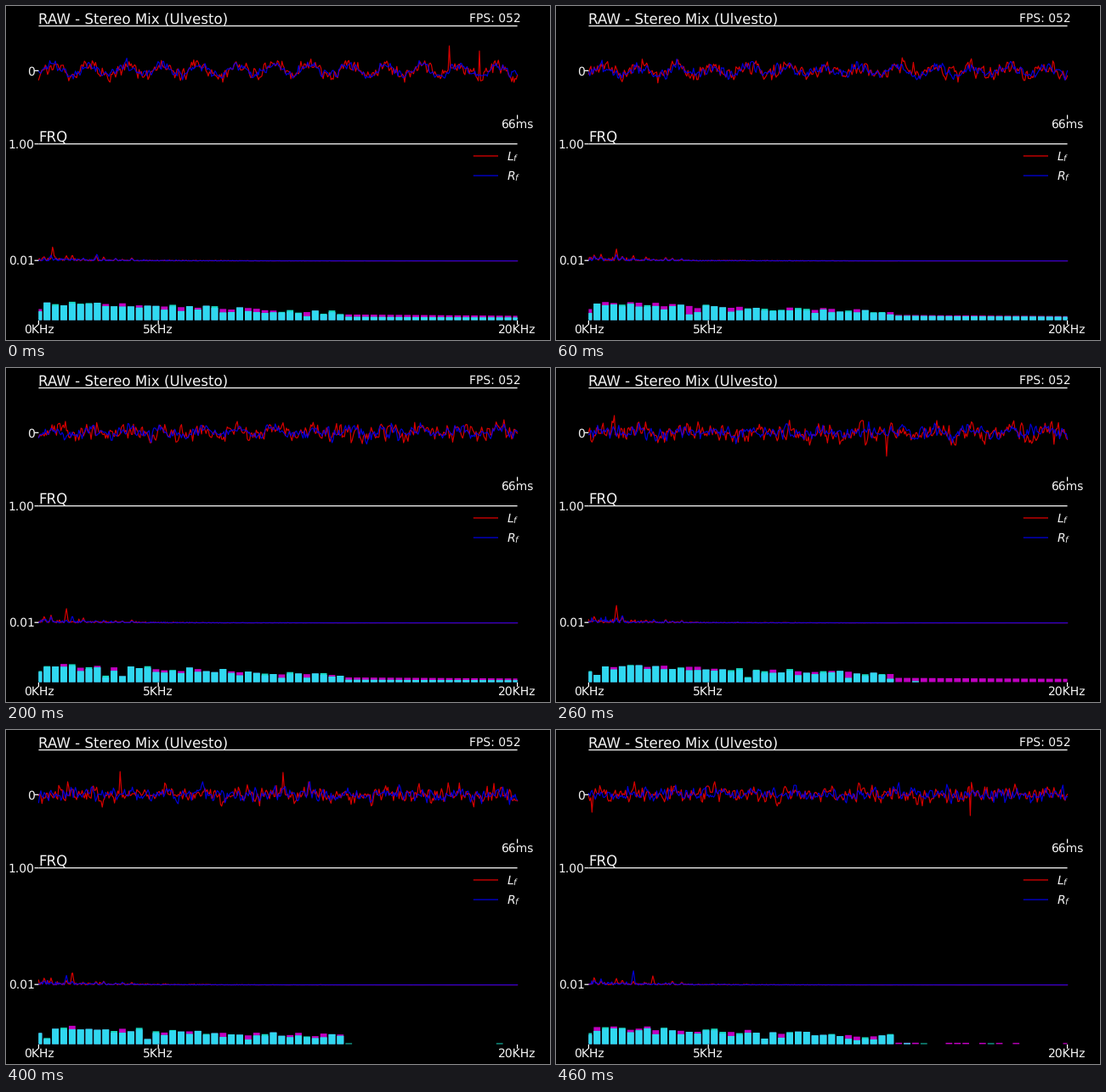
Animation, 640 px wide and 394 px high, one loop 0.52 s. Source, as a matplotlib script:

```python
import numpy as np
import matplotlib.pyplot as plt
from matplotlib.animation import FuncAnimation

plt.rcParams["font.family"] = "DejaVu Sans"
plt.rcParams["mathtext.fontset"] = "dejavusans"
plt.rcParams["text.hinting"] = "no_hinting"

W, H, DPI = 640, 394, 100
LEFT, RIGHT = 38.4, 601.6
WAVE_Y, FREQ_Y, BAR_Y = 76, 300.7, 370.5
BARS, BODY, STEP, HALF = 58, 37, 9.86, 3.9
TICK_MS, LOOP_MS = 10, 520
STARTS = [0, 60, 130, 200, 260, 330, 400, 460]
PITCHES = [45, 53, 71, 78, 91, 106, 115, 129, 137, 148]

wave_x = np.linspace(LEFT, RIGHT, 430)
freq_x = np.linspace(LEFT, RIGHT, 620)
index = np.arange(BARS)


def wave(rng, swing, rough, spikes=()):
    """Rough noise on a slow swell; spikes are (x, y) extremes."""
    noise = np.convolve(rng.normal(size=wave_x.size), [0.2, 0.9, 0.2], "same")
    swell = swing * np.cos(2 * np.pi * (wave_x - 55) / 43.5)
    y = WAVE_Y - np.clip(swell + rough * noise, -15, 15)
    for px, py in spikes:
        y[np.argmin(abs(wave_x - px))] = py
    return y


def spectrum(rng, strength, main):
    """Fading noise with narrow peaks at the pitches and one main peak."""
    d = freq_x - LEFT
    h = abs(rng.normal(size=d.size)) * (1.9 * np.exp(-d / 75)
                                        + 0.4 * np.exp(-d / 180))
    fade = np.exp(-(np.array(PITCHES) - LEFT) / 110)
    heights = strength * fade * rng.uniform(0.2, 1, len(PITCHES))
    for px, ph in [*zip(PITCHES, heights), main]:
        h = np.maximum(h, ph * (1 - abs(freq_x - px) / 2.4))
    return FREQ_Y - h


def bars(rng, tail, cap):
    """Bar heights of both channels: a sloping body, then a low tail."""
    top = 20.5 - 0.31 * index + rng.uniform(-2.5, 2.5, BARS)
    top[0] = 13
    drop = rng.uniform(1.5, 5, BARS) * (rng.random(BARS) < 0.4)
    dips = rng.random(BARS) < 0.08
    right = np.where(dips, 0.4 * top, top - drop)
    left = np.where(drop > 0, top, right - rng.choice([0, 0, 1, 2], BARS))

    rest = index >= BODY
    taper = np.interp(index, [BODY, BARS - 1], [1.1, 0.85])
    right[rest] = (tail * taper if tail else rng.random(BARS) < 0.1)[rest]
    lit = (cap > 2) | (rng.random(BARS) < 0.45)
    left[rest] = (cap * taper * lit)[rest]
    return left, right


def scene(k, spikes, red, blue, tail, cap):
    rng = np.random.default_rng(100 + k)
    swing, rough = max(2, 6.5 - k), min(5.6, 4.1 + 0.4 * k)
    left, right = bars(rng, tail, cap)
    return dict(wave_l=wave(rng, swing, rough, spikes),
                wave_r=wave(rng, 0.9 * swing, 0.75 * rough),
                freq_l=spectrum(rng, 12, red),
                freq_r=spectrum(rng, 9, blue),
                left=left, right=right)


SCENES = [
    scene(0, [(521, 47), (557, 53)], (55, 18), (107, 9), 3.5, 6),
    scene(1, [], (71, 15), (71, 8), 4.5, 5.5),
    scene(2, [(181, 57), (216, 54)], (71, 16), (44, 8), 5, 4.5),
    scene(3, [], (71, 18), (78, 9), 2.5, 5),
    scene(4, [(68, 56), (389, 104)], (71, 22), (78, 10), 0, 4.5),
    scene(5, [(261, 98), (454, 56)], (78, 11), (71, 16), 3.5, 5),
    scene(6, [(134, 49), (326, 50)], (78, 17), (71, 12), 0, 0),
    scene(7, [(42, 97), (487, 101)], (114, 11), (91, 18), 0, 1.5),
]

fig = plt.figure(figsize=(W / DPI, H / DPI), dpi=DPI, facecolor="black")
ax = fig.add_axes([0, 0, 1, 1])
ax.axis("off")


def rule(x0, y0, x1, y1):
    ax.plot([x0, x1], [y0, y1], color="white", lw=0.9, snap=False,
            solid_capstyle="butt", zorder=5)


def label(x, y, text, size=10, ha="left"):
    ax.text(x, y, text, color="#f4f4f4", size=size, ha=ha, va="baseline")


for y in (23.5, 162.7):
    rule(LEFT, y, RIGHT, y)
for y, text in ((76.3, "0"), (162.7, "1.00"), (300.2, "0.01")):
    rule(33.5, y, LEFT, y)
    label(33.5, y + 5, text, ha="right")
for x, text in ((LEFT, "0KHz"), (179.2, "5KHz"), (RIGHT, "20KHz")):
    rule(x, 371, x, 376)
    label(x, 386, text, ha="center")
rule(RIGHT, 128.5, RIGHT, 133.5)
label(RIGHT, 143.5, "66ms", ha="center")
label(LEFT, 21.9, "RAW - Stereo Mix (Ulvesto)", 12)
label(LEFT, 160, "FRQ", 12)
label(605.5, 18.7, "FPS: 052", ha="right")

for y, color, text in ((176.9, "red", "$L_f$"), (200.1, "blue", "$R_f$")):
    ax.plot([550.5, 578.3], [y, y], color=color, lw=1, alpha=0.8, snap=False)
    label(588.8, y + 5, text)


def trace(x, color):
    return ax.plot(x, 0 * x, color=color, lw=0.85, alpha=0.85, snap=False)[0]


lines = {"wave_l": trace(wave_x, "red"), "wave_r": trace(wave_x, "blue"),
         "freq_l": trace(freq_x, "red"), "freq_r": trace(freq_x, "blue")}

centers = LEFT + STEP * index
lo = np.clip(centers - HALF, LEFT, RIGHT)
hi = np.clip(centers + HALF, LEFT, RIGHT)


def bar_row(color):
    return ax.bar(lo, np.zeros(BARS), hi - lo, bottom=BAR_Y, align="edge",
                  color=color, lw=0, snap=False)


left_bars = bar_row("#bf00bf")
right_bars = bar_row("#18d8c0")
both_bars = bar_row("#30d8f0")
ax.set(xlim=(0, W), ylim=(H, 0))


def update(frame):
    s = SCENES[np.searchsorted(STARTS, frame * TICK_MS, side="right") - 1]
    for key, line in lines.items():
        line.set_ydata(s[key])
    both = np.minimum(s["left"], s["right"])
    for row, heights in ((left_bars, s["left"]), (right_bars, s["right"]),
                         (both_bars, both)):
        for bar, h in zip(row, heights):
            bar.set_height(-h)
    return []


anim = FuncAnimation(fig, update, frames=LOOP_MS // TICK_MS, interval=TICK_MS,
                     init_func=lambda: update(0), repeat=True, repeat_delay=0,
                     blit=False)
plt.show()
```
